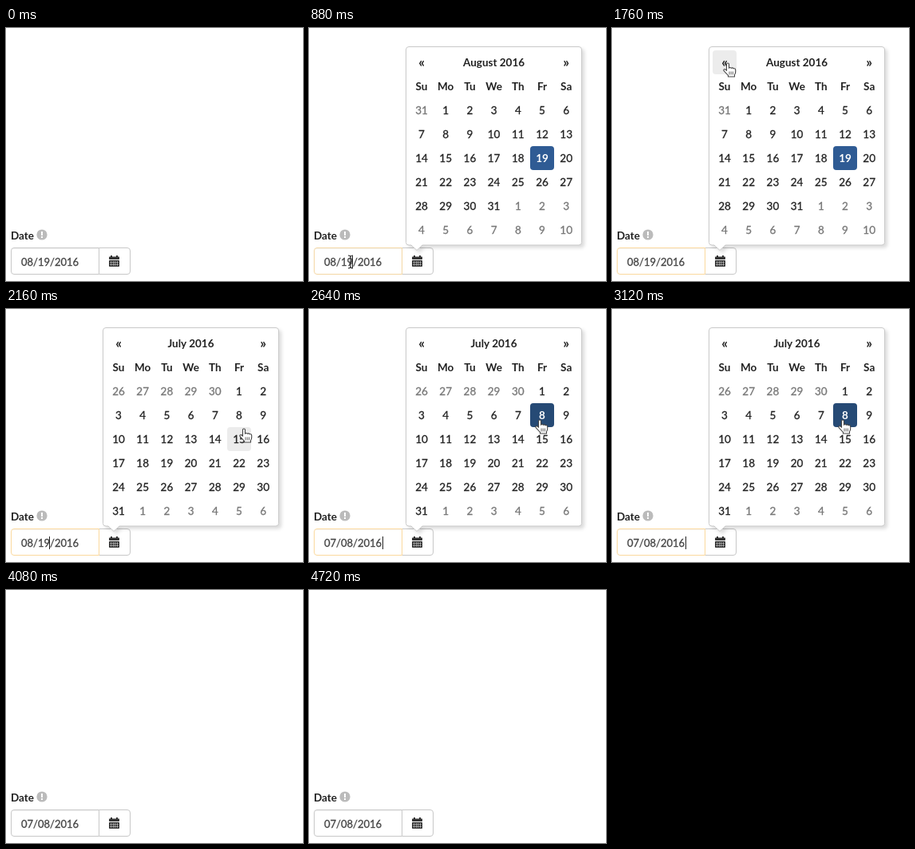
An HTML page that plays this animation: 372x317 px, repeating every 5280 ms.

```html
<!DOCTYPE html>
<html lang="en">
<head>
<meta charset="utf-8">
<title>Date picker</title>
<style>
  html, body { margin: 0; width: 100%; height: 100%; overflow: hidden; background: #fff; }
  svg { display: block; width: 372px; height: 317px; }
  text {
    font: 13.5px Lato, "Open Sans", sans-serif;
    fill: var(--ink, #222); stroke: var(--ink, #222); stroke-width: .3px;
  }
  .bold { font-weight: 700; stroke: none; }
  .mid { text-anchor: middle; }
  .arrow { font-size: 17px; }
  .muted { --ink: #777; }
  .light { --ink: #fff; }
  .value { --ink: #444; font-size: 13px; }
  .popup { filter: drop-shadow(3px 3px 2px rgba(0, 0, 0, .14)); }
</style>
</head>
<body>
<svg id="stage" viewBox="0 0 372 317"></svg>
<script>
const LOOP = 5280, STEP = 80, BLINK = 530;
const FOCUS = 750, PREVIOUS = 1840, PICK = 2620, BLUR = 3930;
const CELL_W = 30.2, CELL_H = 30, LEFT = 126, TOP = 28;
const AUGUST = 7, JULY = 6;
const stage = document.getElementById('stage');

const visits = [
  [
    { start: 80, end: 320, from: [25, 311], to: [45, 301] },
    { start: 560, end: 800, from: [45, 301], to: [52, 293] },
    { start: 880, end: 1200, from: [52, 293], to: [291, 165] },
    { start: 1200, end: 1680, from: [291, 165], to: [145, 44] },
    { start: 1840, end: 2160, from: [145, 44], to: [298, 150] },
    { start: 2160, end: 2480, from: [298, 150], to: [289, 139] },
    { start: 3120, end: 3520, from: [289, 139], to: [384, 163] }
  ],
  [{ start: 4560, end: 4720, from: [273, 308], to: [239, 304] }]
];

const clamp = k => Math.min(1, Math.max(0, k));
const ramp = (t, start, length) => clamp((t - start) / length);
const ease = k => k * k * (3 - 2 * k);

function pointerAt(t) {
  const moves = visits.find(v => t >= v[0].start && t < v.at(-1).end);
  if (!moves) return null;
  const { start, end, from, to } = moves.findLast(m => m.start <= t);
  const k = ease(ramp(t, start, end - start));
  return from.map((v, i) => v + (to[i] - v) * k);
}

const text = (x, y, content, cls = '') => `<text x="${x}" y="${y}" class="${cls}">${content}</text>`;
const rect = (x, y, w, h, fill, r = 0) =>
  `<rect x="${x}" y="${y}" width="${w}" height="${h}" rx="${r}" fill="${fill}"/>`;
const line = (d, stroke, fill = 'none', width = 1) =>
  `<path d="${d}" stroke="${stroke}" fill="${fill}" stroke-width="${width}"/>`;
const mix = (a, b, k) => `rgb(${a.map((v, i) => Math.round(v + (b[i] - v) * k))})`;

function cellAt([x, y]) {
  const col = Math.floor((x - LEFT) / CELL_W), row = Math.floor((y - TOP) / CELL_H);
  const inside = col >= 0 && col < 7 && row >= 0 && row < 8 && row !== 1;
  return inside ? { col, row } : null;
}

function calendarIcon() {
  let out = rect(129, 286.5, 13, 3.5, '#333', .7) + rect(129, 291, 13, 8, '#333', .7)
    + rect(131, 285, 2, 3, '#333') + rect(138, 285, 2, 3, '#333');
  for (let i = 0; i < 4; i++) out += rect(131.5 + i * 2.5, 292, .6, 6, '#ccc');
  for (let i = 0; i < 2; i++) out += rect(130, 293.5 + i * 2.5, 11, .6, '#ccc');
  return out;
}

function caret(t, picked) {
  const sinceReset = t - (picked ? PICK : FOCUS);
  const visible = t >= FOCUS && t < BLUR && Math.floor(sinceReset / BLINK) % 2 === 0;
  return visible ? rect(picked ? 92 : 54, 285, 1, 16, '#222') : '';
}

function field(t, picked) {
  const focus = ramp(t, FOCUS, 150) - ramp(t, BLUR, 150);
  const border = mix([200, 200, 200], [251, 217, 158], focus);
  return text(6, 265, 'Date', 'bold')
    + '<circle cx="45" cy="259" r="6.6" fill="#bbb"/>'
    + rect(44, 255, 2, 5, '#fff') + rect(44, 261, 2, 2, '#fff')
    + line('M116.5 275.5H152a3.5 3.5 0 0 1 3.5 3.5V305a3.5 3.5 0 0 1-3.5 3.5H116.5', '#c8c8c8')
    + line('M8 276.5H116', '#f3f3f3')
    + line('M116.5 275.5H10a3.5 3.5 0 0 0-3.5 3.5V305a3.5 3.5 0 0 0 3.5 3.5H116.5Z', border)
    + text(19, 298, picked ? '07/08/2016' : '08/19/2016', 'value')
    + caret(t, picked) + calendarIcon();
}

function calendar(month, selected, hover) {
  const center = col => LEFT + col * CELL_W + 15;
  const baseline = row => TOP + row * CELL_H + 20;
  const fillCell = (col, row, fill) =>
    rect(LEFT + col * CELL_W, TOP + row * CELL_H, 30, 30, fill, 4);
  const title = (month === AUGUST ? 'August' : 'July') + ' 2016';

  let out = '<g class="popup">'
    + line('M125 23.5H338a3.5 3.5 0 0 1 3.5 3.5V268.5a3.5 3.5 0 0 1-3.5 3.5H142l-7 6.5-7-6.5H125a3.5 3.5 0 0 1-3.5-3.5V27a3.5 3.5 0 0 1 3.5-3.5Z', '#c9c9c9', '#fff')
    + '</g>';
  if (hover) out += fillCell(hover.col, hover.row, '#ececec');
  out += text(center(0), 49, '«', 'mid bold arrow') + text(231.5, 48, title, 'mid bold')
    + text(center(6), 49, '»', 'mid bold arrow');
  ['Su', 'Mo', 'Tu', 'We', 'Th', 'Fr', 'Sa'].forEach((name, col) => {
    out += text(center(col), baseline(1), name, 'mid bold');
  });

  const lead = new Date(2016, month, 1).getDay();
  for (let i = 0; i < 42; i++) {
    const date = new Date(2016, month, 1 - lead + i);
    const col = i % 7, row = 2 + Math.floor(i / 7), day = date.getDate();
    const current = date.getMonth() === month, chosen = current && day === selected;
    if (chosen) {
      const hovered = hover && hover.col === col && hover.row === row;
      out += fillCell(col, row, hovered ? '#264a75' : '#2f5b94');
    }
    out += text(center(col), baseline(row), day, 'mid ' + (chosen ? 'bold light' : current ? '' : 'muted'));
  }
  return out;
}

const pointers = {
  arrow: line('M0 0V15L3.5 11.8 6 17.5 8.5 16.5 6 11H11Z', '#fff', '#111'),
  beam: line('M-3-8Q0-8 0-6Q0-8 3-8M0-6V6M-3 8Q0 8 0 6Q0 8 3 8M-2 2H2', '#333', 'none', 1.2),
  hand: line('M-1.5 1.5C-1.5-.5 1.5-.5 1.5 1.5V6Q3 4.8 4.5 6.3Q6 5.3 7.3 6.8Q9.5 6.2 9.7 8.5V11Q9.7 13 8.5 14.5V17H.5V15.5L-5 9.5Q-5.5 7.3-3.2 7.8L-1.5 9.2Z', '#444', '#fff', 1.1)
    + line('M2 10.5v4M4.2 10.5v4M6.4 10.5v4', '#555', 'none', .9)
};

function pointer([x, y], hover) {
  const overInput = x > 6 && x < 116 && y > 275 && y < 309;
  const kind = hover ? 'hand' : overInput ? 'beam' : 'arrow';
  return `<g transform="translate(${x} ${y})">${pointers[kind]}</g>`;
}

function draw(t) {
  const open = t >= FOCUS && t < BLUR;
  const picked = t >= PICK;
  const month = t < PREVIOUS ? AUGUST : JULY;
  const selected = month === AUGUST ? 19 : picked ? 8 : null;
  const position = pointerAt(t);
  const hover = open && position ? cellAt(position) : null;

  stage.innerHTML = field(t, picked)
    + (open ? calendar(month, selected, hover) : '')
    + (position ? pointer(position, hover) : '');
}

let shown = -1;
const began = performance.now();
function tick() {
  const t = Math.floor((performance.now() - began) % LOOP / STEP) * STEP;
  if (t !== shown) draw(shown = t);
  requestAnimationFrame(tick);
}
tick();
</script>
</body>
</html>
```
